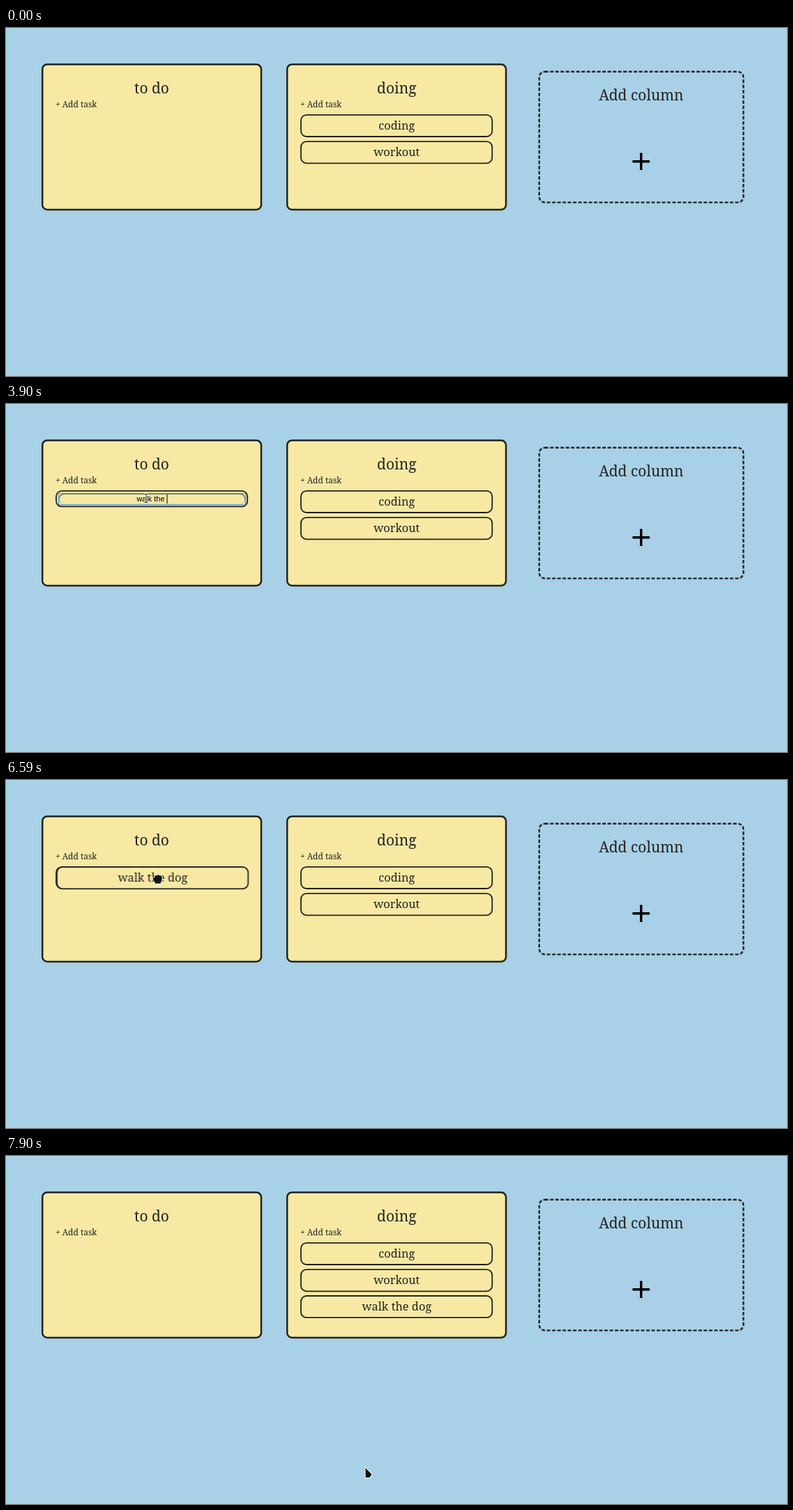
Write an HTML page that moves like this. It is 1120 by 500 pixels and loops after 8 s.

```html
<!DOCTYPE html>
<html lang="en">
<head>
<meta charset="utf-8">
<title>Task board</title>
<style>
  html, body { margin: 0; width: 100%; height: 100%; overflow: hidden; background: #a8d0e6; }
  svg { display: block; }
  text { font-family: "Noto Serif", serif; font-size: 16.4px; fill: #222; text-anchor: middle; }
  .title { font-size: 21px; }
  .add { font-size: 12px; text-anchor: start; }
  .column { fill: #f7e9a3; stroke: #222; stroke-width: 2.5; }
  .row { fill: none; stroke: #222; stroke-width: 1.8; }
  .cursor { fill: #111; stroke: #fff; stroke-width: 1; stroke-linejoin: round; paint-order: stroke; }
  #typed { font: 10.93px "Liberation Sans", Arial, sans-serif; fill: #000; white-space: pre; }
</style>
</head>
<body>
<svg width="1120" height="500" viewBox="0 0 1120 500">
  <defs>
    <linearGradient id="inset" x2="0" y2="1">
      <stop offset=".1" stop-color="#66767c"/>
      <stop offset=".9" stop-color="#d3dbc4"/>
    </linearGradient>
    <g id="column">
      <rect class="column" x="52.2" y="52.2" width="313.8" height="208.8" rx="7"/>
      <text class="add" x="71" y="114">+ Add task</text>
    </g>
    <rect id="row" x="72" y="124.8" width="274.2" height="31.2" rx="8"/>
  </defs>

  <use href="#column"/>
  <use href="#column" x="351"/>
  <text class="title" x="209" y="94">to do</text>
  <text class="title" x="560.3" y="94">doing</text>
  <use class="row" href="#row" x="351"/>
  <text x="560.3" y="146">coding</text>
  <use class="row" href="#row" x="351" y="38.3"/>
  <text x="560.3" y="184">workout</text>

  <rect x="764.7" y="62.8" width="292.8" height="187.8" rx="8" fill="none" stroke="#222"
        stroke-width="2.4" stroke-dasharray="5 2.5"/>
  <text class="title" x="911" y="104">Add column</text>
  <path d="M898.5 191.7h24.6M910.8 179.4v24.6" stroke="#000" stroke-width="3.4"/>

  <g id="field">
    <rect class="row" x="72" y="124.8" width="274.2" height="22.6" rx="8"/>
    <rect x="76.3" y="129.3" width="266.4" height="14.6" rx="7" fill="none" stroke="url(#inset)" stroke-width="1.6"/>
    <rect id="focus" x="75.5" y="128.5" width="268" height="16.4" rx="1.5" fill="none" stroke="#4f93c6" stroke-width="1.2"/>
    <text id="typed" x="209" y="140"></text>
    <rect id="caret" y="130" width="1" height="13"/>
  </g>

  <g id="task">
    <use class="row" href="#row"/>
    <text x="209.3" y="146">walk the dog</text>
  </g>
  <g id="ghost" opacity=".8">
    <use class="row" href="#row" style="fill:#f7e9a3"/>
    <text x="209.3" y="146">walk the dog</text>
  </g>

  <g id="cursor">
    <path id="arrow" class="cursor" d="M0 0L9 9.5L6 14H0Z" style="stroke-width:2"/>
    <path id="pointer" class="cursor" style="stroke-width:2"
          d="M-2 1Q0-2 2 1V6L8 7.5Q10 9 8 16H0L-4 10Q-4 8-2 9.5Z"/>
    <path id="grab" class="cursor" style="stroke-width:1.6"
          d="M-6.5 0Q-6.5-3-4-2V-4Q-3-6.5-.8-5Q1-7 3-5Q6.3-5.5 6.3-2V2Q6 4 4.5 5V6.5H-3.5V5Q-6.5 2-6.5 0Z"/>
    <g id="beam" fill="none">
      <path d="M-2.5-6H2.5M0-6V6M-2.5 6H2.5" stroke="#fff" stroke-width="2.8"/>
      <path d="M-2.5-6H2.5M0-6V6M-2.5 6H2.5" stroke="#222" stroke-width="1"/>
    </g>
  </g>
</svg>
<script>
const LOOP = 8000, PHRASE = "walk the dog";
const KEY_TIMES = [2560, 2650, 2810, 3010, 3270, 3550, 3640, 3730, 3900, 4000, 4110, 4210];
const FOCUS = 1750, COMMIT = 5280, DRAG = 6590, DROP = 7370;
const GRIP = { x: 216, y: 142 };

// time, x, y
const PATH = [
  [110, 126, 121], [390, 118, 111], [580, 118, 111], [700, 116, 106], [860, 118, 111],
  [1050, 118, 111], [1210, 168.5, 131.5], [1570, 201, 137], [1710, 201, 137], [1830, 201, 131],
  [1960, 201, 135.5], [4690, 201, 135.5], [4900, 214, 209], [5350, 214, 209], [5600, 224, 205],
  [5900, 219, 161.5], [6060, GRIP.x, GRIP.y], [DRAG, GRIP.x, GRIP.y], [6800, 484, 212],
  [6960, 548, 222], [DROP, 558, 228], [7420, 558, 228], [7900, 515.5, 448]
];
// start time, cursor shape
const SHAPES = [[0, ""], [110, "arrow"], [250, "pointer"], [1100, "beam"], [4730, "arrow"], [6100, "grab"], [7420, "arrow"]];

const $ = id => document.getElementById(id);
const show = (id, on) => $(id).style.display = on ? "" : "none";
const place = (id, x, y) => $(id).setAttribute("transform", `translate(${x} ${y})`);
const within = (t, from, to) => t >= from && t < to;

function cursorAt(t) {
  const next = PATH.findIndex(p => p[0] > t);
  if (next < 1) return next ? PATH.at(-1).slice(1) : PATH[0].slice(1);
  const [t0, x0, y0] = PATH[next - 1], [t1, x1, y1] = PATH[next];
  const k = (t - t0) / (t1 - t0);
  return [x0 + (x1 - x0) * k, y0 + (y1 - y0) * k];
}

function render(t) {
  const [x, y] = cursorAt(t);
  const shape = SHAPES.findLast(s => s[0] <= t)[1];
  place("cursor", x, y);
  for (const id of ["arrow", "pointer", "beam", "grab"]) show(id, id === shape);

  const text = PHRASE.slice(0, KEY_TIMES.filter(k => k <= t).length);
  if ($("typed").textContent !== text) $("typed").textContent = text;
  show("field", within(t, 720, COMMIT));
  show("focus", t >= FOCUS);
  show("caret", within(t, FOCUS, 2250) || within(t, KEY_TIMES[0], 4710));
  $("caret").setAttribute("x", 209 + (text ? $("typed").getComputedTextLength() / 2 : 0));

  show("task", t >= COMMIT);
  place("task", t < DROP ? 0 : 351, t < DROP ? 0 : 76.2);
  show("ghost", within(t, DRAG, DROP));
  place("ghost", x - GRIP.x, y - GRIP.y);
}

function tick() {
  render(performance.now() % LOOP);
  requestAnimationFrame(tick);
}
tick();
</script>
</body>
</html>
```
